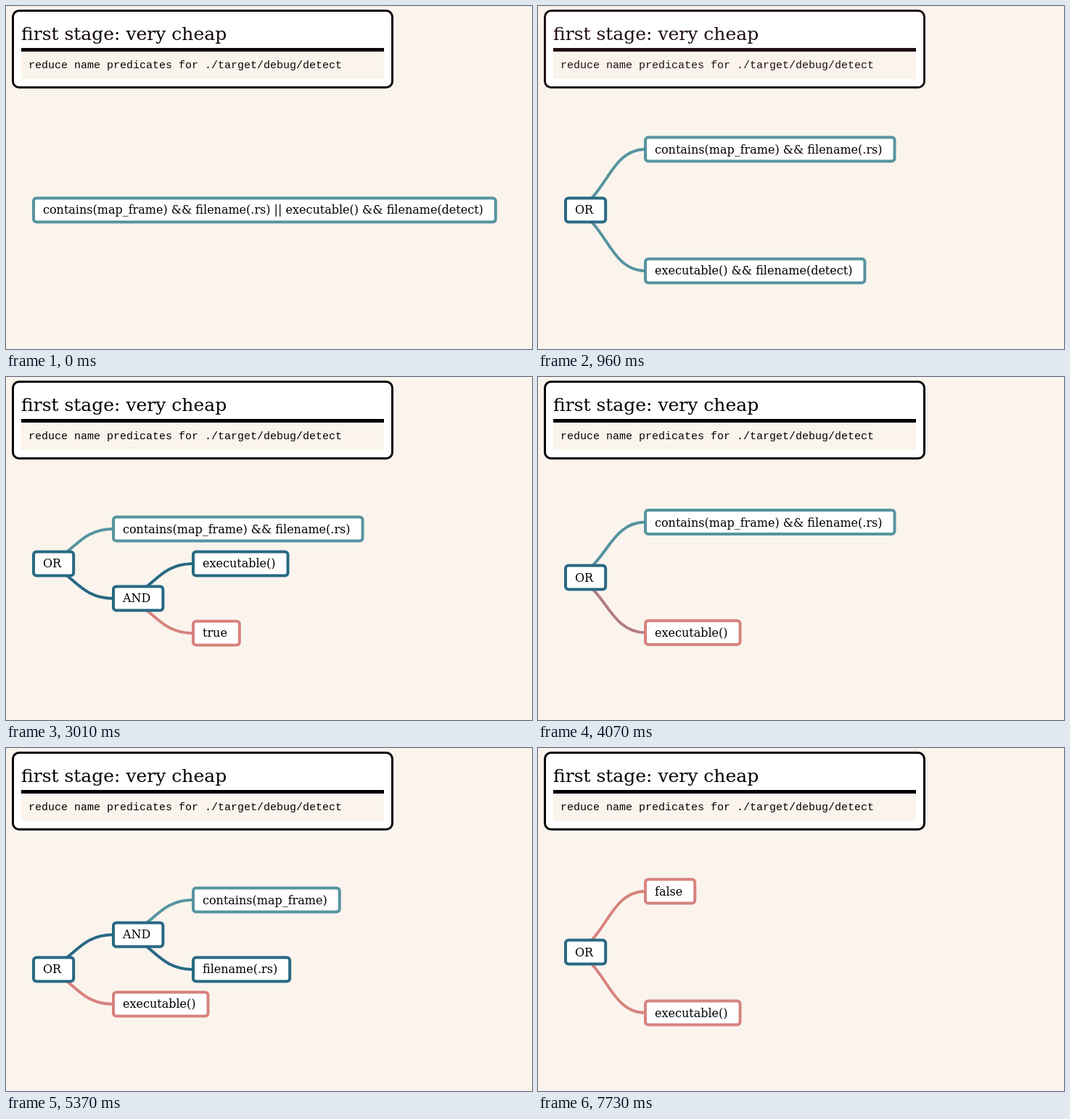
Recreate the animation shown at these times as an HTML page. Size 725x474 px, loop 8000 ms.

```html
<!DOCTYPE html>
<html lang="en">
<head>
<meta charset="utf-8">
<title>Predicate reduction</title>
<style>
  html, body { margin: 0; width: 100%; height: 100%; overflow: hidden; background: #faf4ed; }
  svg { display: block; }
  text { font: 16px "DejaVu Serif", serif; white-space: pre; }
  #header text { fill: currentColor; }
  #header .title { font-size: 25px; }
  #header .code { font: 15px "Liberation Mono", monospace; }
  #edges { fill: none; stroke-width: 4; }
  #nodes rect { fill: #fff; stroke-width: 4; }
</style>
</head>
<body>
<svg width="725" height="474" viewBox="0 0 725 474">
  <g id="header">
    <rect x="9.5" y="6.5" width="523" height="106" rx="8.5" fill="#fff" stroke="currentColor" stroke-width="3"/>
    <text class="title" x="21" y="47">first stage: very cheap</text>
    <rect x="21" y="58" width="500" height="5" fill="currentColor"/>
    <rect x="21" y="63" width="500" height="38" fill="#faf4ed"/>
    <text class="code" x="31" y="86">reduce name predicates for ./target/debug/detect</text>
  </g>
  <g id="edges"></g>
  <g id="nodes"></g>
</svg>
<script>
const LOOP = 8000, MOVE = 250;
const FOAM = '#56949f', PINE = '#286983', ROSE = '#d7827e', LOVE = '#b4637a';

// Child nodes and their parents, in drawing order.
const parents = { root: null, top: 'root', topA: 'top', topB: 'top', low: 'root', lowA: 'low', lowB: 'low' };

const node = (text, depth, y, color) => ({ text, x: 38 + 110 * depth, y, color });
const or = y => node('OR', 0, y, PINE);
const and = y => node('AND', 1, y, PINE);
const source = 'contains(map_frame) && filename(.rs)';
const binary = 'executable() && filename(detect)';

// Each step: start time, nodes that change, and whether its text rests low afterwards.
const steps = [
  [-MOVE, { root: node(`${source} || ${binary}`, 0, 282, FOAM) }],
  [405, { root: or(282), top: node(source, 1, 198, FOAM), low: node(binary, 1, 366, FOAM) }],
  [975, { root: or(258), top: node(source, 1, 210, FOAM), low: and(306),
          lowA: node('executable()', 2, 258, FOAM), lowB: node('filename(detect)', 2, 354, FOAM) }, true],
  [1535, { lowB: node('filename(detect)', 2, 354, PINE) }],
  [2192, { lowB: node('true', 2, 354, ROSE) }],
  [2740, { lowA: node('executable()', 2, 258, PINE) }],
  [3342, { lowA: node('executable()', 2, 258, ROSE) }],
  [3915, { root: or(282), top: node(source, 1, 198, FOAM),
           low: node('executable()', 1, 366, ROSE), lowA: null, lowB: null }, true],
  [4508, { root: or(306), top: and(258), topA: node('contains(map_frame)', 2, 210, FOAM),
           topB: node('filename(.rs)', 2, 306, FOAM), low: node('executable()', 1, 354, ROSE) }, true],
  [5100, { topB: node('filename(.rs)', 2, 306, PINE) }],
  [5702, { topB: node('false', 2, 306, ROSE) }],
  [6272, { topA: node('contains(map_frame)', 2, 210, PINE) }],
  [6852, { topA: node('contains(map_frame)', 2, 210, ROSE) }],
  [7458, { root: or(282), top: node('false', 1, 198, ROSE), topA: null, topB: null,
           low: node('executable()', 1, 366, ROSE) }, true],
];
const states = [];
for (const [start, changes, low] of steps) {
  const previous = states.at(-1)?.tree ?? changes;
  states.push({ start, low, previous, tree: { ...previous, ...changes } });
}

const byId = id => document.getElementById(id);
const clamp = v => Math.min(1, Math.max(0, v));
const lerp = (a, b, p) => a + (b - a) * p;
const cubic = t => t < 0.5 ? 4 * t ** 3 : 1 - 4 * (1 - t) ** 3;
const swell = t => Math.sin(clamp(t) * Math.PI / 2) ** 2;

const pen = document.createElement('canvas').getContext('2d');
pen.font = '16px "DejaVu Serif", serif';
const widths = {};
const textWidth = text => widths[text] ??= pen.measureText(text).width;

function box({ text, x, y, color }, lowered) {
  const baseline = Math.round(y + (lowered || y <= 210 ? 6 : 5));
  return `<rect x="${x}" y="${y - 16.5}" width="${textWidth(text) + 30}" height="33" rx="4" stroke="${color}"/>
    <text x="${x + 13}" y="${baseline}">${text}</text>`;
}

function edge(from, to, color) {
  const mid = (from.x + to.x) / 2;
  return `<path d="M${from.x} ${from.y}C${mid} ${from.y} ${mid} ${to.y} ${to.x} ${to.y}" style="stroke:${color}"/>`;
}

function draw(t) {
  const glow = t < 400 ? swell((t + 150) / 490) : swell((1270 - t) / 810);
  byId('header').style.color = `color-mix(in oklab, ${LOVE} ${glow * 100}%, black)`;

  const { start, low, previous, tree } = states.findLast(s => s.start <= t);
  const p = cubic(clamp((t - start) / MOVE));
  const placed = {};
  let edges = '', nodes = '';
  for (const [id, parent] of Object.entries(parents)) {
    const target = tree[id];
    if (!target) continue;
    const origin = previous[id] ?? previous[parent];
    const current = placed[id] = { ...target, x: lerp(origin.x, target.x, p), y: lerp(origin.y, target.y, p) };
    if (parent) {
      const before = previous[id]?.color ?? target.color;
      edges += edge(placed[parent], current, `color-mix(in srgb, ${target.color} ${p * 100}%, ${before})`);
    }
    nodes += box(current, low);
  }
  byId('edges').innerHTML = edges;
  byId('nodes').innerHTML = nodes;
}

const begin = performance.now();
function tick() {
  draw((performance.now() - begin) % LOOP);
  requestAnimationFrame(tick);
}
tick();
</script>
</body>
</html>
```
